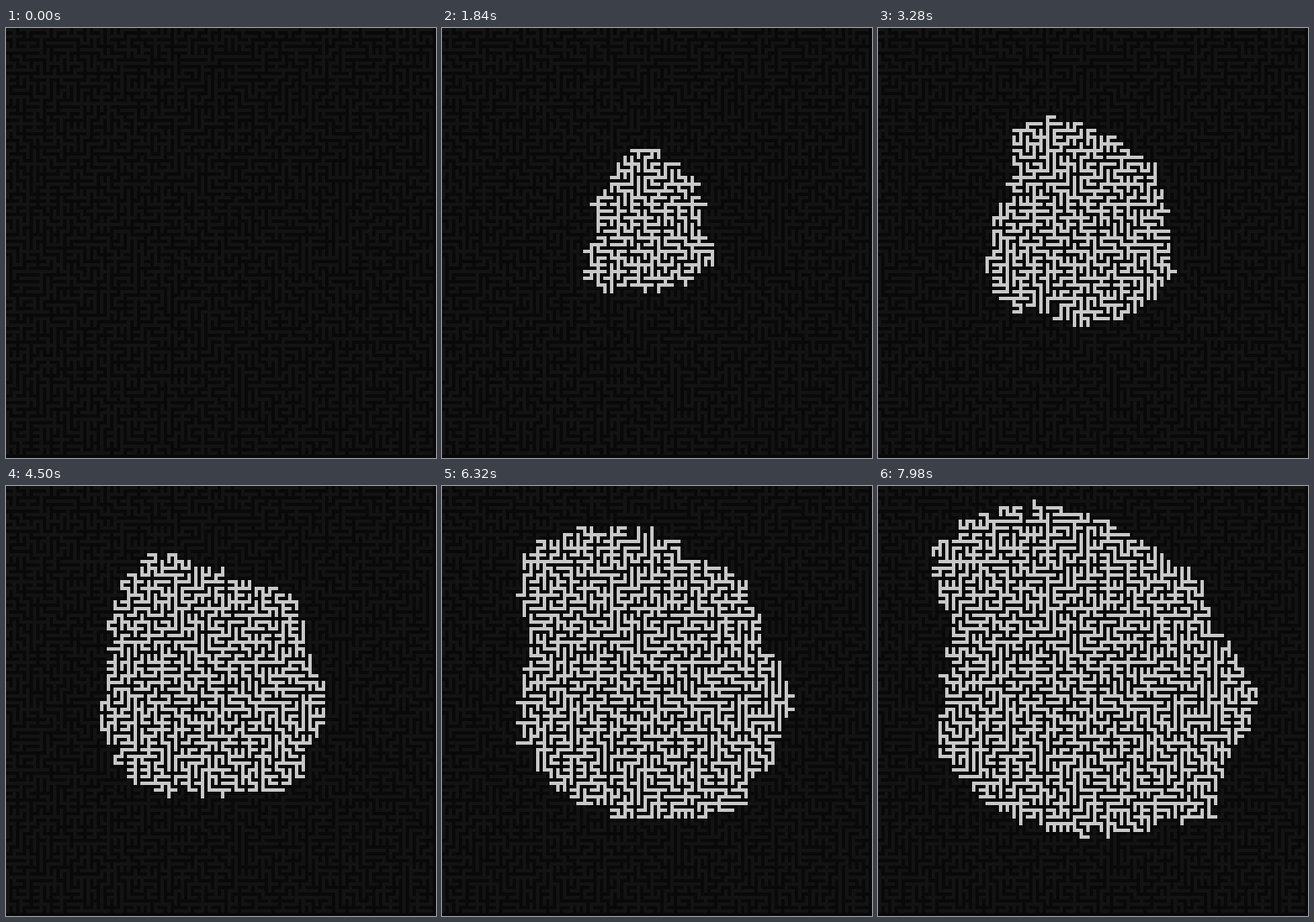
An HTML page with a canvas for the animation above (8000 ms loop, 512 by 512 pixels).

```html
<!DOCTYPE html>
<html lang="en">
<head>
<meta charset="utf-8">
<title>Maze flood</title>
<style>
  html, body { margin: 0; width: 100%; height: 100%; overflow: hidden; background: #090909; }
  canvas { display: block; width: 512px; height: 512px; }
</style>
</head>
<body>
<canvas id="stage" width="512" height="512"></canvas>
<script>
const LOOP = 8000, HOLD = 600, STEP = 20, PER_STEP = 5;
const N = 64, PITCH = 8, LINE = 4;
const ROOT = 30 * N + 31;
const WALL = '#090909', PATH = '#131313', LIT = '#c8c8c8';

// Reach of the flood in 16 directions, clockwise from east, at a few moments.
const REACH = [
  [1240, [52, 80, 72, 70, 74, 76, 92, 95, 70, 78, 65, 98, 97, 80, 72, 65]],
  [2680, [95, 113, 112, 108, 117, 108, 132, 130, 112, 106, 140, 150, 124, 110, 116, 104]],
  [3900, [135, 132, 148, 135, 127, 132, 152, 141, 136, 130, 168, 178, 136, 134, 142, 114]],
  [5040, [148, 150, 174, 155, 144, 150, 160, 160, 142, 150, 205, 198, 178, 157, 152, 126]],
  [6420, [185, 172, 188, 172, 165, 166, 167, 187, 164, 160, 238, 217, 200, 178, 178, 160]],
  [7380, [202, 190, 208, 188, 175, 178, 180, 190, 170, 172, 258, 236, 210, 184, 186, 166]]
];

let seed = 20417;
function random() {
  seed = (seed + 0x6D2B79F5) | 0;
  let t = Math.imul(seed ^ (seed >>> 15), 1 | seed);
  t = (t + Math.imul(t ^ (t >>> 7), 61 | t)) ^ t;
  return ((t ^ (t >>> 14)) >>> 0) / 4294967296;
}

const col = c => c % N;
const row = c => Math.floor(c / N);

// Approximate moment at which the flood arrives at a cell.
function arrival(cell) {
  const dx = (col(cell) - col(ROOT)) * PITCH;
  const dy = (row(cell) - row(ROOT)) * PITCH;
  const dist = Math.hypot(dx, dy);
  const turn = (Math.atan2(dy, dx) / (2 * Math.PI) + 1) * 16 % 16;
  const i = Math.floor(turn), f = turn - i;
  let t0 = 0, r0 = 0;
  for (const [t1, radii] of REACH) {
    const r1 = radii[i] * (1 - f) + radii[(i + 1) % 16] * f;
    if (dist <= r1) return t0 + (t1 - t0) * (dist - r0) / (r1 - r0);
    t0 = t1;
    r0 = r1;
  }
  return t0 + (dist - r0) * 40;
}

const due = Array.from({ length: N * N }, (_, c) => arrival(c));

// Grows from the root, always along the cheapest open link.
function grow(neighbours, noise) {
  const seen = new Uint8Array(N * N);
  const open = [], links = [];
  const visit = cell => {
    seen[cell] = 1;
    for (const to of neighbours(cell)) {
      if (!seen[to]) open.push({ from: cell, to, cost: due[to] + random() * noise });
    }
  };
  visit(ROOT);
  while (open.length) {
    let best = 0;
    for (let i = 1; i < open.length; i++) {
      if (open[i].cost < open[best].cost) best = i;
    }
    const link = open[best];
    open[best] = open[open.length - 1];
    open.pop();
    if (seen[link.to]) continue;
    links.push(link);
    visit(link.to);
  }
  return links;
}

function gridNeighbours(c) {
  const list = [];
  if (col(c) > 0) list.push(c - 1);
  if (col(c) < N - 1) list.push(c + 1);
  if (row(c) > 0) list.push(c - N);
  if (row(c) < N - 1) list.push(c + N);
  return list;
}

const tree = Array.from({ length: N * N }, () => []);
for (const { from, to } of grow(gridNeighbours, 1800)) tree[from].push(to);
const flood = grow(c => tree[c], 600);

function drawLink(ctx, { from, to }) {
  const a = Math.min(from, to);
  const across = Math.abs(from - to) === 1;
  const long = PITCH + LINE;
  ctx.fillRect(col(a) * PITCH, row(a) * PITCH, across ? long : LINE, across ? LINE : long);
}

const maze = document.createElement('canvas');
maze.width = maze.height = N * PITCH;
const mazeCtx = maze.getContext('2d');
mazeCtx.fillStyle = WALL;
mazeCtx.fillRect(0, 0, maze.width, maze.height);
mazeCtx.fillStyle = PATH;
flood.forEach(link => drawLink(mazeCtx, link));

const ctx = document.getElementById('stage').getContext('2d');
const start = performance.now();

function draw() {
  const t = (performance.now() - start) % LOOP;
  ctx.drawImage(maze, 0, 0);
  if (t >= HOLD) {
    const count = (Math.floor((t - HOLD) / STEP) + 1) * PER_STEP;
    ctx.fillStyle = LIT;
    for (let i = 0; i < count; i++) drawLink(ctx, flood[i]);
  }
  requestAnimationFrame(draw);
}
draw();
</script>
</body>
</html>
```
